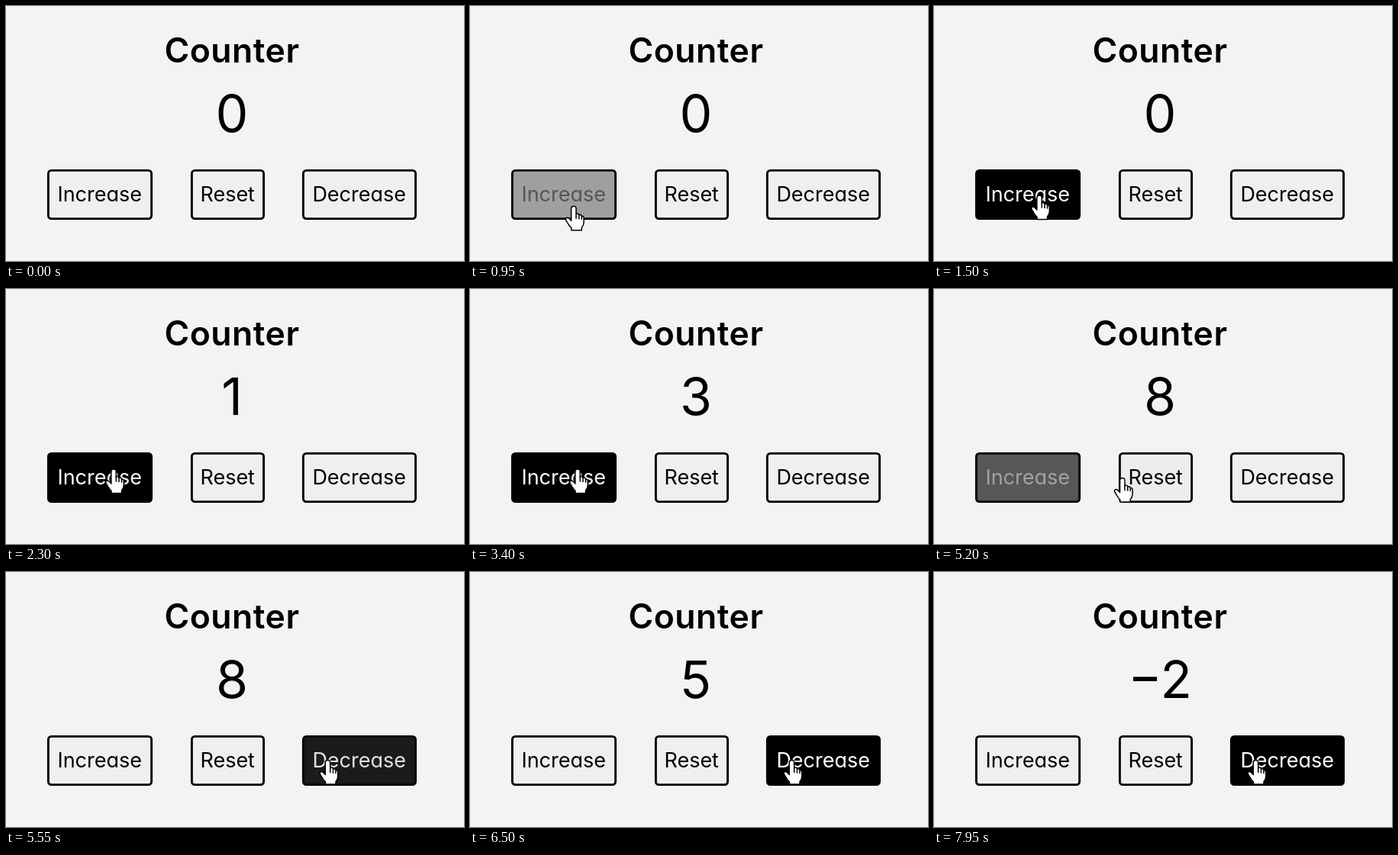
An HTML page for the animation above (8000 ms loop, 600x334 px).

```html
<!DOCTYPE html>
<html lang="en">
<head>
<meta charset="utf-8">
<title>Counter</title>
<style>
  html, body { margin: 0; width: 100%; height: 100%; overflow: hidden; background: #f3f3f3; }
  svg { display: block; width: 100vw; height: 100vh; }
  text {
    font-family: Inter, Lato, sans-serif;
    font-optical-sizing: none;
    font-feature-settings: "cv11" 1;
    text-anchor: middle;
  }
  .title { font-size: 44.5px; font-weight: 600; letter-spacing: .5px; }
  .count { font-size: 68px; font-weight: 400; }
  .button text { font-size: 27px; font-weight: 400; }
  .button rect { stroke: #000; stroke-width: 2.9; }
  .cursor path { fill: #fff; stroke: #000; stroke-width: 1.5; stroke-linejoin: round; stroke-linecap: round; }
</style>
</head>
<body>
<svg viewBox="0 0 600 334">
  <text class="title" x="296" y="74">Counter</text>
  <text class="count" id="count" x="296" y="164.5">0</text>
  <g id="buttons"></g>
  <g id="cursor" class="cursor">
    <path id="arrow" d="M0 0V24L5.5 19L9 27L13 25.3L9.6 17.5H17Z"/>
    <g id="hand">
      <path d="M-3.2 3Q-3.2 0 0 0Q3.2 0 3.2 3V10Q6.8 9 7 11.5Q10 10.5 10.5 13Q13.3 12.5 13.3 16V21Q13.3 25 10.5 28V31.5H-3V28.5Q-6 25.5 -7.5 22.5L-10 18.5Q-11 15.5 -8.5 15Q-6.5 14.8 -3.2 19Z"/>
      <path style="fill:none" d="M3.2 10v6M7 11.5v5M10.5 13v4"/>
    </g>
  </g>
</svg>
<script>
const LOOP = 8000, FADE = 300;
const $ = id => document.getElementById(id);
const clamp = v => Math.min(1, Math.max(0, v));
const mix = (a, b, u) => a + (b - a) * u;
const smooth = u => u * u * (3 - 2 * u);
const easeOut = u => 1 - (1 - u) ** 2;

// cubic-bezier(.25, .1, .25, 1)
function cssEase(x) {
  x = clamp(x);
  const curve = (a, b, s) => 3 * a * s * (1 - s) ** 2 + 3 * b * s * s * (1 - s) + s ** 3;
  let lo = 0, hi = 1;
  for (let i = 0; i < 24; i++) {
    const mid = (lo + hi) / 2;
    if (curve(.25, .25, mid) < x) lo = mid; else hi = mid;
  }
  return curve(.1, 1, lo);
}

const buttons = [
  { label: "Increase", x: 54, w: 138, on: 886, off: 5132 },
  { label: "Reset", x: 242, w: 97, on: 5195, off: 5303 },
  { label: "Decrease", x: 388, w: 150, on: 5370, off: LOOP }
];

function add(parent, tag, attrs) {
  const el = document.createElementNS("http://www.w3.org/2000/svg", tag);
  for (const k in attrs) el.setAttribute(k, attrs[k]);
  return parent.appendChild(el);
}

for (const b of buttons) {
  const g = add($("buttons"), "g", { class: "button" });
  b.rect = add(g, "rect", { x: b.x + 1.4, y: 215.4, width: b.w - 2.8, height: 63.2, rx: 4 });
  b.text = add(g, "text", { x: b.x + b.w / 2 - .3, y: 256 });
  b.text.textContent = b.label;
}

// time, x, y
const path = [
  [664, 124, 340], [1138, 138, 248], [1740, 138, 248], [2050, 141, 236],
  [3600, 141, 236], [4320, 150.5, 248], [5020, 150.5, 248], [5470, 421.5, 246.5]
];

function cursorAt(t) {
  const i = path.findIndex(p => p[0] > t);
  if (i < 1) return path[i ? path.length - 1 : 0].slice(1);
  const a = path[i - 1], b = path[i];
  const u = (i === 1 ? easeOut : smooth)((t - a[0]) / (b[0] - a[0]));
  return [mix(a[1], b[1], u), mix(a[2], b[2], u)];
}

const ups = [2150, 2750, 3300, 3850, 4300, 4550, 4790, 5000];
const countAt = t =>
  ups.filter(c => c <= t).length - Math.max(0, Math.floor((t - 5970) / 207) + 1);

// A fade cut short runs back in proportionally less time.
function hoverAt(b, t) {
  if (t < b.on) return 0;
  const peak = cssEase((Math.min(t, b.off) - b.on) / FADE);
  return t < b.off ? peak : peak * (1 - cssEase((t - b.off) / (FADE * peak)));
}

const grey = v => `rgb(${Array(3).fill(Math.round(v))})`;

function draw(t) {
  $("count").textContent = String(countAt(t)).replace("-", "\u2212");
  for (const b of buttons) {
    const h = hoverAt(b, t);
    b.rect.style.fill = grey(mix(239, 0, h));
    b.text.style.fill = grey(mix(0, 255, h));
  }
  const over = buttons.some(b => t >= b.on && t < b.off);
  $("cursor").setAttribute("transform", `translate(${cursorAt(t)})`);
  $("cursor").style.display = t < path[0][0] ? "none" : "";
  $("hand").style.display = over ? "" : "none";
  $("arrow").style.display = over ? "none" : "";
}

const start = performance.now();
function tick() {
  draw((performance.now() - start) % LOOP);
  requestAnimationFrame(tick);
}
tick();
</script>
</body>
</html>
```
